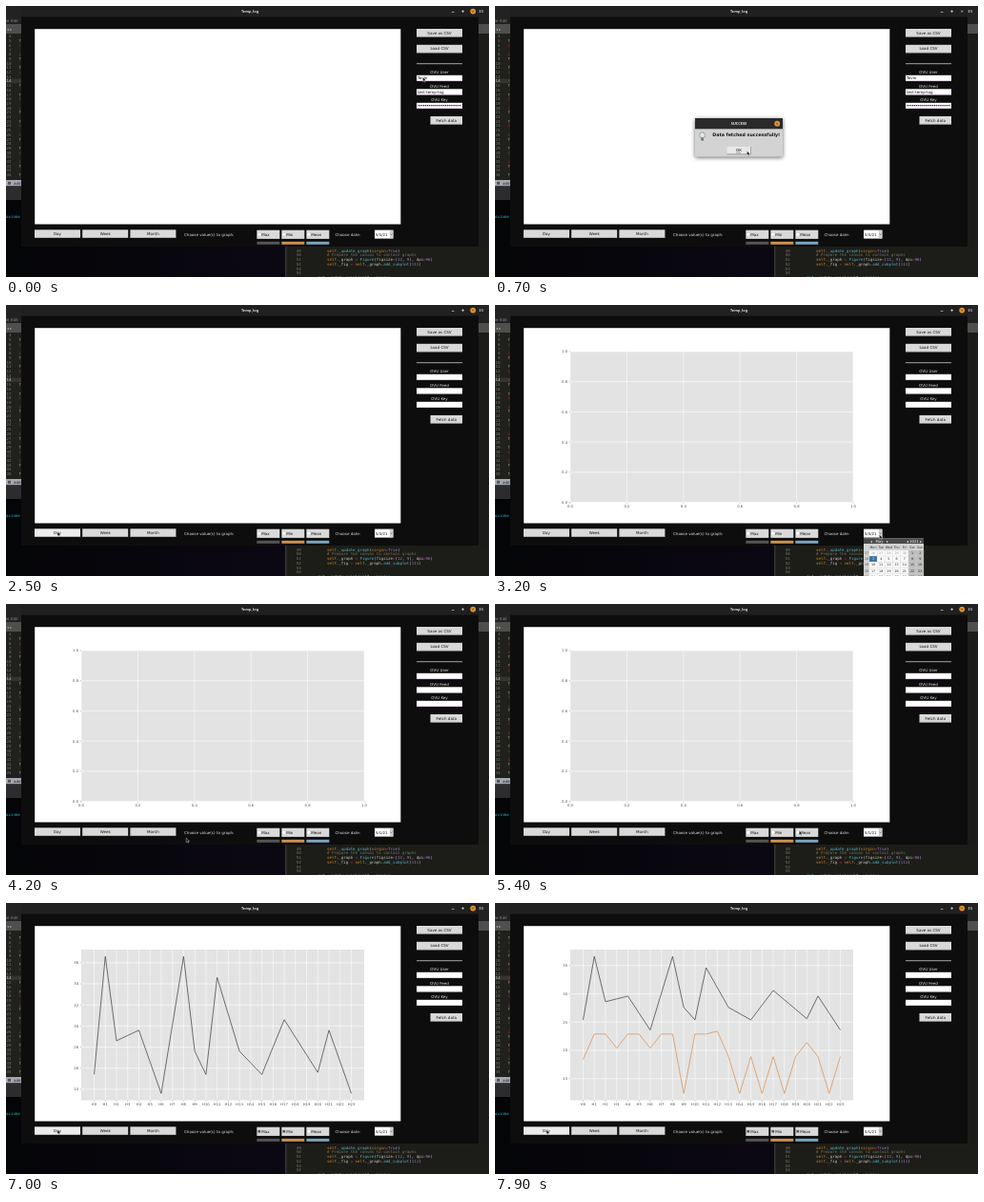
These frames come from a looping animation (507 px wide and 285 px high, 8000 ms). An HTML page:

```html
<!DOCTYPE html>
<html lang="en">
<head>
<meta charset="utf-8">
<title>Temp_log</title>
<style>
html, body { margin: 0; width: 100%; height: 100%; overflow: hidden; background: #0a0a0c; }
svg { display: block; width: 507px; height: 285px; font-family: "DejaVu Sans", sans-serif; }
.title { font-family: "Noto Sans", sans-serif; font-weight: bold; }
.code { font-family: "DejaVu Sans Mono", monospace; }
.dialog { filter: drop-shadow(0 1px 2px #0009); }
</style>
</head>
<body>
<svg id="stage" viewBox="0 0 507 285"></svg>
<script>
const LOOP = 8000, STEP = 100;
const stage = document.getElementById('stage');

const rect = (x, y, w, h, fill, extra = '') =>
  `<rect x="${x}" y="${y}" width="${w}" height="${h}" fill="${fill}" ${extra}/>`;
const text = (x, y, str, fill = '#111', size = 4.05, anchor = 'start', cls = '') =>
  `<text x="${x}" y="${y}" fill="${fill}" font-size="${size}" text-anchor="${anchor}" class="${cls}">${str}</text>`;
const path = (d, stroke, width = .6, extra = '') =>
  `<path d="${d}" stroke="${stroke}" stroke-width="${width}" fill="none" stroke-linejoin="round" ${extra}/>`;
const code = (x, y, str, fill = '#c8c8c0', anchor = 'start') => text(x, y, str, fill, 4.1, anchor, 'code');
const button = (x, y, w, label, fill = '#d9d9d9', h = 8.5) =>
  rect(x, y, w, h, fill) + path(`M${x} ${y + h - .3}h${w}`, '#aaa', .5) +
  text(x + w / 2, y + h / 2 + 1.3, label, '#111', 4.05, 'middle');
const cross = (x, y, color) => path(`M${x - 1} ${y - 1}l2 2m0-2l-2 2`, color);
const closeButton = (x, y) => `<circle cx="${x}" cy="${y}" r="2.9" fill="#e8952e"/>` + cross(x, y, '#4a3010');
const range = (n, draw) => Array.from({ length: n }, (_, i) => draw(i));
const join = (n, draw) => range(n, draw).join('');

const checkX = i => 263.3 + 26 * i;
const buttonX = i => 30 + 50.2 * i;
const calendarX = col => 397 + 8.2 * col;

// Desktop behind the window
function desktop() {
  const paint = color => str => `<tspan fill="${color}">${str}</tspan>`;
  const orange = paint('#d88a2c'), pink = paint('#d02a62'), blue = paint('#58b4c8'), violet = paint('#9a75d8');
  const self = orange('self');
  const lines = [
    `${self}.${blue('_update_graph')}(${orange('virgin')}${pink('=')}${violet('True')})`,
    paint('#77735f')('# Prepare the canvas to contain graphs'),
    `${self}._graph ${pink('=')} ${blue('Figure')}(figsize${pink('=')}(${violet(12)}, ${violet(9)}), dpi${pink('=')}${violet(96)})`,
    `${self}._fig ${pink('=')} ${self}._graph.${blue('add_subplot')}(${violet(111)})`
  ];
  const leftY = i => 33.4 + 4.7 * i, rightY = i => 258.5 + 4.75 * i;
  return `<defs><linearGradient id="night"><stop stop-color="#040507"/>
    <stop offset="1" stop-color="#120a1c"/></linearGradient></defs>` +
    rect(0, 0, 507, 285, 'url(#night)') + rect(0, 0, 507, 19, '#222') + text(0, 16.5, 'le Edit', '#888') +
    rect(0, 19, 16, 10, '#4f504d') + text(1, 25.5, '◂ ▸', '#aaa') +
    rect(0, 29, 16, 154, '#20211c') + rect(0, 76.5, 16, 4.7, '#33342c') +
    join(32, i => code(5.5, leftY(i), i + 4, i === 10 ? '#c8c8c0' : '#77786f', 'end') +
      (i % 3 ? code(13.2, leftY(i), 'if'[i % 2], i % 2 ? '#a8a8a0' : '#a32a52') : '')) +
    rect(0, 183, 16, 6.5, '#a6a8b0') + rect(2, 184.8, 3, 3, '#555') + text(8, 187.8, 'add', '#222') +
    rect(0, 189.5, 16, 14.5, '#2c2c2e') + code(0, 223.4, 'ovinke', '#2fb4c4') +
    rect(496, 19, 11, 10, '#4f504d') + rect(496, 29, 11, 224, '#1b1c18') +
    rect(293, 253, 214, 32, '#1c1d18') + rect(293, 253, 1.5, 32, '#35362f') +
    lines.map((line, i) => code(337, rightY(i), line)).join('') +
    join(6, i => code(309.7, rightY(i), 49 + i, '#77786f', 'end')) +
    code(327, 286.5, blue('def') + ' _update_graph(self, virgin)') + text(496.5, 7, 'E5', '#eee', 3.9);
}

// Fixed parts of the window
function frame() {
  const fields = ['User', 'Feed', 'Key'].map((name, i) => {
    const y = 72.8 + 14.5 * i;
    return text(455, y - 1.8, 'OVU ' + name, '#ddd', 4.05, 'middle') +
      rect(431, y, 48, 6.1, '#fff') + path(`M431 ${y + 5.8}h48`, '#dcc6e2', .6);
  });
  return rect(16, 0, 480, 11.5, '#202020') + rect(16, 11.5, 480, 241.5, '#0d0d0d') +
    text(256, 6.9, 'Temp_log', '#ddd', 3.9, 'middle', 'title') +
    path('M467.8 6.4h2.6M478.2 5.6h2.8M479.6 4.2v2.8', '#ddd', .7) + rect(30.2, 24.2, 384.1, 205.3, '#fff') +
    button(431, 24, 48, 'Save as CSV') + button(431, 40.8, 48, 'Load CSV') +
    path('M431 60.7h48', '#ccc', .8) + button(445.5, 116, 33.5, 'Fetch data') + fields.join('') +
    button(buttonX(1), 235.3, 48, 'Week') + button(buttonX(2), 235.3, 48, 'Month') +
    text(187, 241.8, 'Choose value(s) to graph:', '#ddd') + text(345.5, 241.8, 'Choose date:', '#ddd') +
    ['#555', '#cd9250', '#79a6c0'].map((c, i) => rect(checkX(i), 247.8, 24, 3, c)).join('');
}

// Daily maximum runs straight between its turning points
const TURNS = [[0, 25.4], [1, 36.6], [2, 28.6], [4, 29.6], [6, 23.6], [8, 36.6], [9, 27.6], [10, 25.4],
  [11, 34.6], [13, 27.6], [15, 25.4], [17, 30.6], [20, 25.6], [21, 29.6], [23, 23.6]];
const maxTemps = range(24, hour => {
  const i = Math.max(1, TURNS.findIndex(p => p[0] >= hour)), [h0, v0] = TURNS[i - 1], [h1, v1] = TURNS[i];
  return v0 + (v1 - v0) * (hour - h0) / (h1 - h0);
});
// Minimum dips every third hour, then every second hour from midday, with a few outliers
const OUTLIERS = { 0: 18.4, 9: 12.4, 12: 23.4, 20: 21.4 };
const minTemps = range(24, hour => OUTLIERS[hour] ??
  (hour < 13 ? (hour % 3 ? 22.9 : 20.4) : (hour % 2 ? 18.9 : 12.4)));

const [left, top_, width, height] = [79, 49, 297, 158.5];

function axes(xTicks, yTicks) {
  const tick = (grid, mark) => path(grid, '#fff', .55) + path(mark, '#777', .4);
  return rect(left, top_, width, height, '#e3e3e3') +
    xTicks.map(([x, label]) => tick(`M${x} ${top_}v${height}`, `M${x} ${top_ + height}v1.3`) +
      text(x, 212.8, label, '#555', 3.8, 'middle')).join('') +
    yTicks.map(([y, label]) => tick(`M${left} ${y}h${width}`, `M${left} ${y}h-1.3`) +
      text(left - 2.9, y + 1.4, label, '#555', 3.8, 'end')).join('');
}

function emptyChart() {
  const ticks = at => range(6, i => [at(i / 5), (i / 5).toFixed(1)]);
  return axes(ticks(v => left + width * v), ticks(v => top_ + height * (1 - v)));
}

function dayChart(...series) {
  const all = series.flat(), low = Math.min(...all), high = Math.max(...all);
  const inset = u => (1 + 20 * u) / 22;
  const px = hour => left + width * inset(hour / 23);
  const py = v => top_ + height * (1 - inset((v - low) / (high - low)));
  const step = high - low > 18 ? 5 : 2, yTicks = [];
  for (let v = Math.ceil(low / step) * step; v <= high; v += step) yTicks.push([py(v), v]);
  return axes(range(24, hour => [px(hour), 'H' + hour]), yTicks) + series.map((data, k) =>
    path('M' + data.map((v, hour) => `${px(hour)} ${py(v)}`).join('L'), ['#2a2a2a', '#d9843f'][k], .65)).join('');
}

function calendar() {
  const label = (x, y, str, fill = '#222', size = 3.3) => text(x, y, str, fill, size, 'middle');
  const day = (row, col) => {
    const n = row * 7 + col - 4, chosen = n === 3, y = 261 + 6.1 * row;
    return rect(calendarX(col) - 3.9, y - 2.9, 7.8, 5.7, chosen ? '#3d6f9e' : col > 4 ? '#bdbdbd' : '#fafafa') +
      label(calendarX(col), y + 1.2, n < 1 ? n + 30 : n, chosen ? '#fff' : n < 1 ? '#999' : '#222');
  };
  return rect(387, 245.3, 63, 40, '#d2d2d2') + rect(387, 245.3, 63, 5.7, '#4a4a4a') +
    label(403.5, 249.6, '◂ &#160; May &#160; ▸', '#fff', 3.8) + label(440, 249.6, '◂ 2021 ▸', '#fff', 3.8) +
    'Mon Tue Wed Thu Fri Sat Sun'.split(' ').map((name, i) => label(calendarX(i), 255.9, name)).join('') +
    join(5, row => label(390, 262.2 + 6.1 * row, 17 + row, '#555') + join(7, col => day(row, col)));
}

function popup() {
  return `<g class="dialog">${rect(210, 118, 92, 40.5, '#d3d3d3', 'rx="1"')}</g>` +
    rect(210, 118, 92, 11.3, '#2a2a2a') + text(256, 125.1, 'SUCCESS', '#eee', 3.9, 'middle', 'title') +
    closeButton(296.2, 123.7) +
    '<circle cx="217.6" cy="135.8" r="2.9" fill="#dfe9ec" stroke="#777" stroke-width=".6"/>' +
    rect(216.3, 138.6, 2.6, 3, '#66757d') +
    `<g font-weight="bold">${text(228.3, 137.2, 'Data fetched successfully!', '#111', 4.75)}</g>` +
    button(243.5, 148, 25, 'OK', '#e8e8e8', 8) + path('M243.5 156h25v-8', '#777', .5) + path('M253 154.4h5', '#111', .3);
}

// Pointer tour: arrival time and place; each trip takes at most TRIP
const TRIP = 500;
const check = i => [checkX(i) + 4, 238.5];
const day = [54, 238.5], fetchData = [460, 119], ok = [264.5, 152.5], date = [403.5, 241.5];
const saturday = [calendarX(5), 260], userField = [437.5, 75];
const TOUR = [[0, userField], [300, fetchData], [700, ok], [2400, day], [3100, date], [3700, saturday], [4400, day],
  [5400, check(2)], [5700, check(0)], [6200, day], [6600, check(1)], [6900, day], [7500, check(2)], [7900, day]];

function pointerAt(t) {
  const i = TOUR.findLastIndex(stop => stop[0] <= t), [left, from] = TOUR[i];
  const [arrive, to] = TOUR[i + 1] ?? [LOOP, from], start = Math.max(left, arrive - TRIP);
  const u = Math.max(0, (t - start) / (arrive - start)), ease = u * u * (3 - 2 * u);
  return from.map((v, axis) => v + (to[axis] - v) * ease);
}

const backdrop = desktop() + frame();
const charts = [[7200, dayChart(maxTemps, minTemps)], [6300, dayChart(maxTemps)], [2600, emptyChart()], [0, '']];

function draw(t) {
  const [mx, my] = pointerAt(t), dialog = t >= 400 && t < 1000;
  const onDay = mx > 30 && mx < 78 && my > 235.3 && my < 243.8;
  let out = backdrop + charts.find(chart => t >= chart[0])[1];
  out += dialog ? cross(490.2, 5.6, '#ddd') : closeButton(490.2, 5.6);
  if (t < 1000) {
    out += text(432, 77.2, 'Tovin') + text(432, 91.7, 'test-temp-log') +
      path('M432.3 104.6H478', '#222', 1.1, 'stroke-dasharray="1.2 .7"');
  }
  out += button(buttonX(0), 235.3, 48, 'Day', t === 4700 ? '#c3c3c3' : onDay ? '#ececec' : '#d9d9d9');
  out += [['Max', 5700], ['Min', 6600], ['Mean', 7500]].map(([name, since], i) =>
    rect(checkX(i), 235.7, 24, 9.2, '#d9d9d9') +
    rect(checkX(i) + 1.2, 238.9, 2.6, 2.6, t >= since ? '#555' : '#fff') +
    text(checkX(i) + 4.9, 241.6, name)).join('');
  out += rect(387, 235.6, 19.5, 9, '#fff') + rect(402.8, 236, 3.4, 8.2, '#d0d0d0') +
    path('M403.6 239.6l.9 1.1 .9-1.1', '#333', .5) + text(388, 241.5, t < 3800 ? '5/3/21' : '5/1/21', '#111', 3.9);
  if (t >= 3100 && t < 3800) out += calendar();
  if (dialog) out += popup();
  out += `<path d="M${mx} ${my}v4.6l1.1-1 .8 1.7 .8-.4-.8-1.6h1.5z" fill="#111" stroke="#fff" stroke-width=".35"/>`;
  stage.innerHTML = out;
}

let shown = -1;
function tick() {
  const t = Math.floor(performance.now() % LOOP / STEP) * STEP;
  if (t !== shown) draw(shown = t);
  requestAnimationFrame(tick);
}
tick();
</script>
</body>
</html>
```
